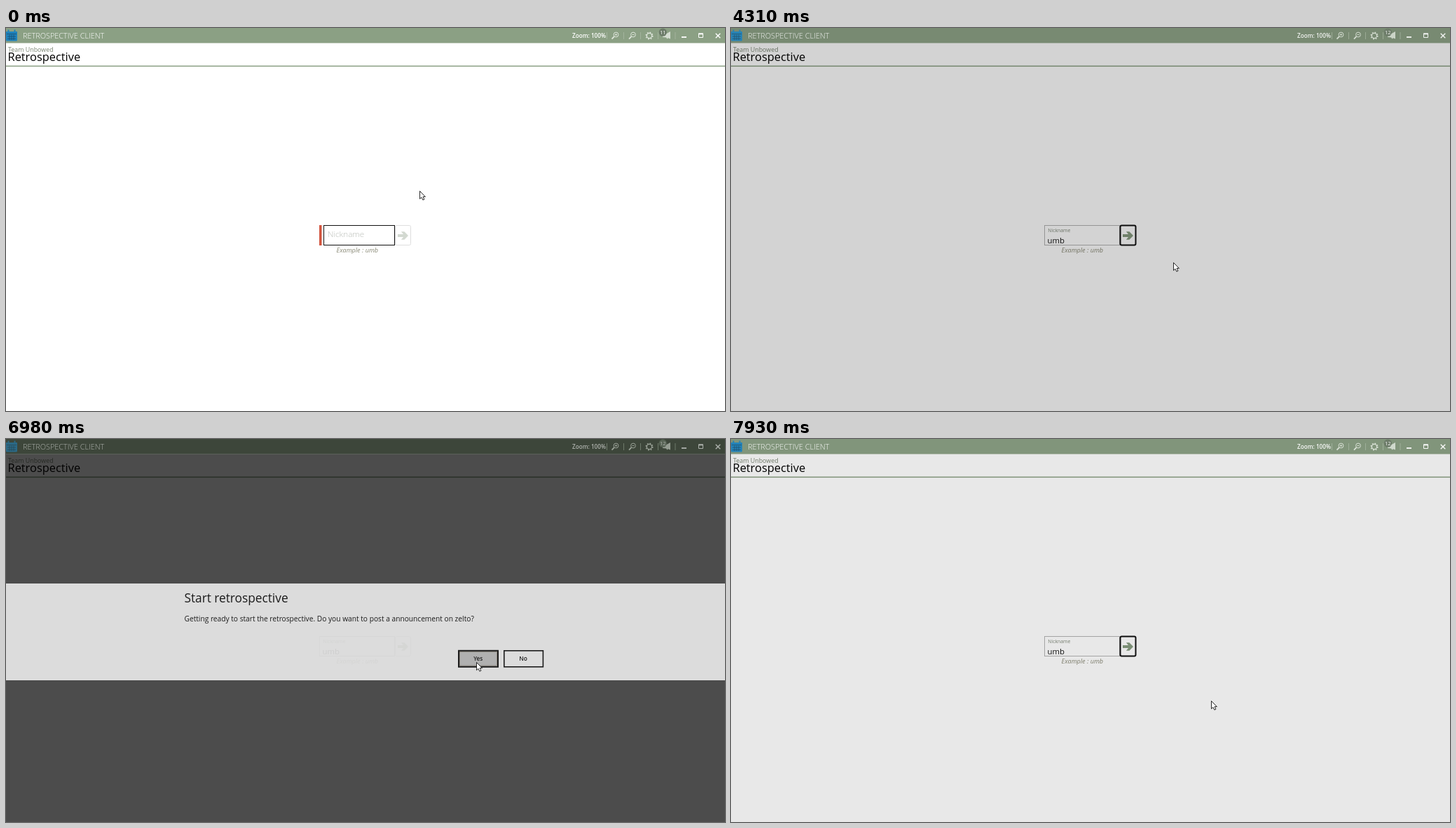
These frames come from a looping animation (1026x546 px, 7.99 s). An HTML page:

```html
<!DOCTYPE html>
<html lang="en">
<head>
<meta charset="utf-8">
<title>Retrospective client</title>
<style>
html, body { margin: 0; width: 100%; height: 100%; overflow: hidden; background: #fff; }
svg { display: block; width: 1026px; height: 546px; font-family: "Open Sans", "Noto Sans", sans-serif; }
.light { font-weight: 300; }
.semi { font-weight: 600; }
</style>
</head>
<body>
<svg viewBox="0 0 1026 546">
  <defs>
    <g id="lens" fill="none" stroke="#dfe6dc">
      <circle cx="1" cy="-1.5" r="3.4"/>
      <path d="M-1.6 1.2L-5 4.6" stroke-width="1.7"/>
    </g>
  </defs>
  <rect width="1026" height="546" fill="#fff"/>
  <rect width="1026" height="21.5" fill="#8ba084"/>
  <text x="3" y="33.6" font-size="8.9" fill="#7a8573">Team Unbowed</text>
  <text x="2.5" y="47" font-size="16.4" font-weight="500">Retrospective</text>
  <rect y="53.6" width="1026" height="1.5" fill="#8ba084"/>

  <rect id="bar" x="447" y="281" width="3.5" height="29" fill="#d2553f"/>
  <rect id="box" y="281.5" height="28" fill="#fff"/>
  <text id="hint" class="light" x="459" y="298" font-size="11.7" fill="#b9bdb7">Nickname</text>
  <text id="label" x="452.3" font-size="6.85" fill="#7f8878">Nickname</text>
  <text id="typed" x="451.5" y="307" font-size="11.3" fill="#111"></text>
  <rect id="caret" y="296" width="1" height="12" fill="#111"/>
  <rect id="go" y="281.5" x="555.5" width="22" height="28" rx="2"/>
  <path id="arrow" d="M559 294.1H567L563.9 290.2H568.4L574 296L568.4 301.8H563.9L567 297.9H559Z"/>
  <text x="471.5" y="320" font-size="9.1" font-style="italic" fill="#8b8b78">Example : umb</text>
  <g id="tip">
    <rect x="570.5" y="308.5" width="78" height="17" fill="#fff" stroke="#c8c8c8"/>
    <text x="575" y="320.7" font-size="8" fill="#333">Start retrospective</text>
  </g>

  <g id="shade">
    <rect id="shadeTop" width="1026" height="21.5"/>
    <rect id="shadeBody" y="21.5" width="1026" height="524.5"/>
  </g>

  <g id="chrome">
    <g fill="#1f83bd">
      <path d="M0 5H16V17Q16 18.5 14.5 18.5H1.5Q0 18.5 0 17Z"/>
      <path d="M2.5 2.5h2v3h-2zM11.5 2.5h2v3h-2z"/>
      <path d="M1 8.5H15M2 12H14M2 15.3H14M5 9.5V17M8 9.5V17M11 9.5V17" fill="none" stroke="#1a4f70" stroke-width=".8"/>
    </g>
    <text class="light" x="24" y="15" font-size="10.9" fill="#fff">RETROSPECTIVE CLIENT</text>
    <text class="semi" x="808" y="14.3" font-size="8.2" fill="#fff">Zoom: 100%</text>
    <path d="M857.5 6V16M881.5 6V16M905.5 6V16M930.5 6V16M955 6V16" stroke="#a9b8a4" stroke-width=".8"/>
    <use href="#lens" x="869.5" y="11"/>
    <use href="#lens" x="894" y="11"/>
    <path d="M868.8 9.5h3.4M870.5 7.8v3.4M893.3 9.5h3.4" stroke="#dfe6dc" stroke-width=".9"/>
    <g fill="none" stroke="#dfe6dc">
      <circle cx="918" cy="11" r="3.6" stroke-width="1.2"/>
      <circle cx="918" cy="11" r="4.8" stroke-width="1.5" stroke-dasharray="1.7 2.07"/>
    </g>
    <path d="M937 11L948 5V15.5L945 14.3L943.5 15.5L942 13.5L937 13Z" fill="#d5ddd2"/>
    <circle cx="937.3" cy="6.2" r="5.6" fill="#6c7b69"/>
    <text id="badge" x="937.3" y="9" font-size="7.6" fill="#fff" text-anchor="middle"></text>
    <g fill="none" stroke="#fff">
      <path d="M964 13H971" stroke-width="1.8"/>
      <path d="M988.5 13.5V8H994.5V13.5Z"/>
      <path d="M988 8.4H995" stroke-width="1.8"/>
      <path d="M1012.7 7.7L1019.3 14.3M1019.3 7.7L1012.7 14.3" stroke-width="1.3"/>
    </g>
  </g>

  <g id="dialog">
    <rect y="206" width="1026" height="138" fill="#fff"/>
    <text x="254.5" y="233" font-size="17.3" fill="#111">Start retrospective</text>
    <text x="254.5" y="260.4" font-size="10.2" fill="#111">Getting ready to start the retrospective. Do you want to post a announcement on zelto?</text>
    <rect id="yes" x="646" y="301.8" width="56" height="23" stroke="#111" stroke-width="2"/>
    <rect x="647.5" y="303.5" width="53" height="19.6" fill="none" stroke="#5a4a30" stroke-dasharray="1 1" stroke-width=".8"/>
    <text id="yesText" class="semi" x="673.7" y="316.3" font-size="8.1" text-anchor="middle">Yes</text>
    <rect x="710.8" y="301.8" width="55.6" height="23" fill="#fff" stroke="#111" stroke-width="1.6"/>
    <text class="semi" x="738" y="316.3" font-size="8.4" text-anchor="middle" fill="#111">No</text>
  </g>

  <path id="cursor" d="M.5 .5V11.6L3 9.4L4.9 13.2L6.9 12.2L5.1 8.6H8.4Z" fill="#fff" stroke="#111" stroke-width=".9"/>
</svg>
<script>
const LOOP = 7990;
const $ = id => document.getElementById(id);
const set = (id, attrs) => { for (const k in attrs) $(id).setAttribute(k, attrs[k]); };
const show = (id, on) => set(id, { opacity: +on });
const ramp = (t, a, b) => Math.min(1, Math.max(0, (t - a) / (b - a)));
const ease = p => p * p * (3 - 2 * p);
const within = (t, a, b) => t >= a && t < b;

// time, x, y
const path = [
  [2080, 590, 232], [2500, 588, 268], [2840, 572, 296],
  [3950, 572, 296], [4310, 631, 334], [4560, 645, 343],
  [5400, 645, 343], [6140, 668, 320], [6260, 668, 320], [6490, 671, 318],
  [7180, 671, 318], [7540, 685, 373]
];

function pointer(t) {
  const i = path.findIndex(k => k[0] > t);
  if (i < 0) return path[path.length - 1].slice(1);
  if (i === 0) return path[0].slice(1);
  const [a, b] = [path[i - 1], path[i]];
  const p = ease(ramp(t, a[0], b[0]));
  return [a[1] + (b[1] - a[1]) * p, a[2] + (b[2] - a[2]) * p];
}

function drawForm(t, x, y) {
  const filled = t >= 1260;
  const left = filled ? 447.5 : 453.5;
  const clicked = t >= 3800;
  const ring = within(t, 3800, 4660) || t >= 7620;
  const hover = filled && t < 4250 && within(x, 555, 578) && within(y, 281, 310);
  const rise = ease(ramp(t, 1260, 1510));
  const letters = [1260, 1420, 1560].filter(k => t >= k).length;

  show('bar', !filled);
  set('box', { x: left, width: 554.5 - left, stroke: clicked ? '#b4b4b4' : '#111' });
  show('hint', !filled);
  set('label', { y: 297 - 6.5 * rise, opacity: rise });
  $('typed').textContent = 'umb'.slice(0, letters);
  set('caret', { x: [457, 458, 468, 476][letters] });
  show('caret', within(t, 1260, 2100) || within(t, 2630, 3160));
  set('go', {
    fill: hover ? '#d6d6d6' : '#fff',
    stroke: ring ? '#111' : filled ? '#c4c4c4' : '#dedede',
    'stroke-width': ring ? 2 : 1
  });
  set('arrow', { fill: filled ? '#879c80' : '#d3d9d1' });
  show('tip', 0);
  if (!clicked) set('tip', { opacity: ramp(t, 3060, 3260) });
}

function render(t) {
  const [x, y] = pointer(t);
  drawForm(t, x, y);

  const dim = t < 6000 ? 0.7 * ramp(t, 4249, 4499) : 0.7 * (1 - ramp(t, 7225, 8034));
  set('shadeTop', { opacity: dim * 0.8 });
  set('shadeBody', { opacity: dim });
  set('chrome', { opacity: 1 - dim * 0.6 });
  $('badge').textContent = t < 4100 ? 11 : 12;

  const hover = within(x, 645, 703) && within(y, 301, 326);
  set('dialog', { opacity: t < 6000 ? ramp(t, 4675, 4920) : 1 - ramp(t, 6932, 7180) });
  set('yes', { fill: hover ? '#c9c9c9' : '#8ba084' });
  set('yesText', { fill: hover ? '#111' : '#fff' });
  set('cursor', { transform: `translate(${x.toFixed(1)} ${y.toFixed(1)})` });
}

const start = performance.now();
function tick() {
  render((performance.now() - start) % LOOP);
  requestAnimationFrame(tick);
}
render(0);
requestAnimationFrame(tick);
</script>
</body>
</html>
```
